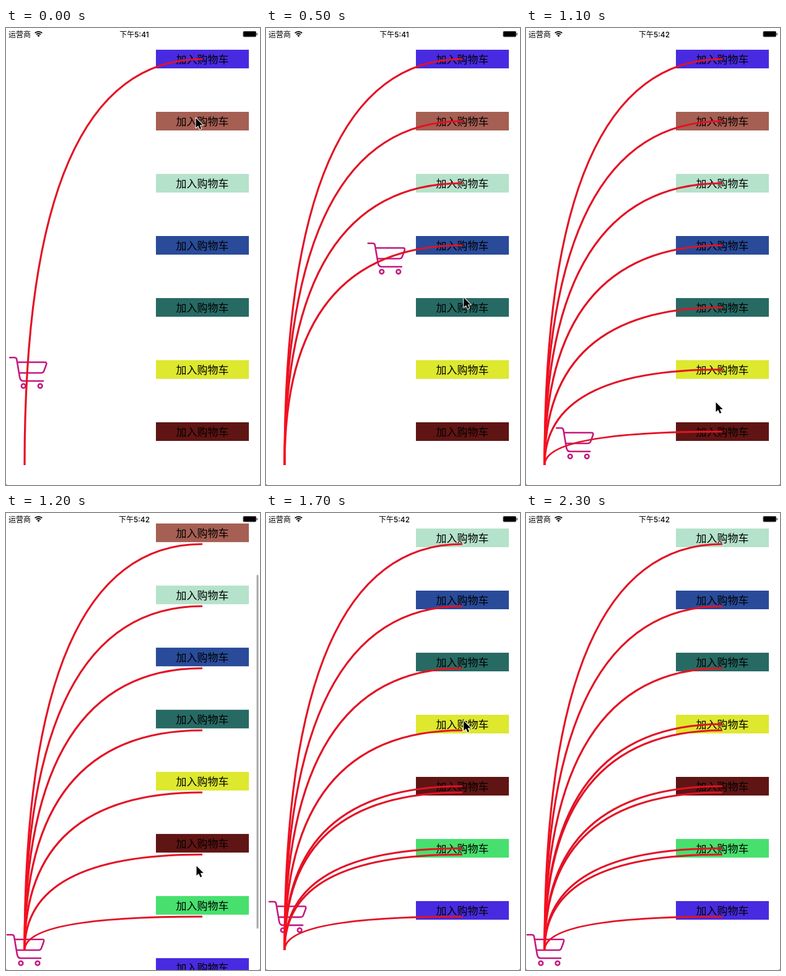
An HTML page with a canvas for the animation above (2400 ms loop, 410 px wide and 736 px high).

```html
<!DOCTYPE html>
<html lang="zh-CN">
<head>
<meta charset="utf-8">
<style>
html, body { margin: 0; width: 100%; height: 100%; overflow: hidden; background: #fff; }
canvas { display: block; width: 410px; height: 736px; }
</style>
</head>
<body>
<canvas id="stage" width="410" height="736"></canvas>
<script>
const ctx = document.getElementById('stage').getContext('2d');
const LOOP = 2400, STEP = 100;
const FLIGHT = 207;              // ms from button to basket
const START_X = 317, END_X = 30, END_Y = 704;
const ROW = 100, MAX_SCROLL = 210, DOWN_TAPS = 7, TAP_COUNT = 10;
const CJK = '"Noto Sans CJK SC", "Noto Sans CJK", sans-serif';
const COLORS = ['#482be0', '#a65f53', '#b5e2ca', '#294b99', '#276a64',
                '#dde82f', '#5f1514', '#47e06e', '#482be0'];

const clamp = v => Math.max(0, Math.min(1, v));
const mix = (a, b, k) => a + (b - a) * k;

// An even rhythm, two quicker taps, then another even run after the scroll
function tapTime(i) {
  if (i < 5) return -182 + 210.3 * i;
  return i < DOWN_TAPS ? 659 + 159 * (i - 4) : 1298 + 217 * (i - DOWN_TAPS);
}

// Taps go down the list, then back up the scrolled list
const taps = Array.from({ length: TAP_COUNT }, (_, i) => ({
  time: tapTime(i),
  y: i < DOWN_TAPS ? 50 + ROW * i : 540 - ROW * (i - DOWN_TAPS)
}));

const scrollAt = t => MAX_SCROLL * clamp((t - 1110) / 160);

function label(text, x, y, font, align) {
  ctx.font = font;
  ctx.textAlign = align;
  ctx.fillStyle = '#000';
  ctx.fillText(text, x, y);
}

function fillRound(color, ...box) {
  ctx.fillStyle = color;
  ctx.beginPath();
  ctx.roundRect(...box);
  ctx.fill();
}

function drawButtons(offset) {
  COLORS.forEach((color, i) => {
    const y = 35 + i * ROW - offset;
    if (y >= 735) return;
    ctx.fillStyle = color;
    ctx.fillRect(242, y, 150, 30);
    label('加入购物车', START_X, y + 22, '17px ' + CJK, 'center');
  });
}

function drawCart(tap, t) {
  const k = clamp((t - tap.time) / FLIGHT);
  ctx.save();
  ctx.translate(mix(END_X, START_X, (1 - k) ** 2), mix(tap.y, END_Y, k * k));
  ctx.strokeStyle = '#c4197f';
  ctx.lineWidth = 2.6;
  ctx.lineCap = ctx.lineJoin = 'round';
  ctx.stroke(new Path2D(
    'M-28-24.8h7.5q3 0 3.6 3L-12 7q1 6 6 6H26' +
    'M-15-17.3H28.5q3.5 0 2.5 3.5L27-3q-1.2 3-4.5 3H-12'));
  for (const x of [-6, 21]) {
    ctx.beginPath();
    ctx.arc(x, 21, 3.3, 0, 7);
    ctx.stroke();
  }
  ctx.restore();
}

function drawCurves(done) {
  // Overlapping strokes look brighter where they meet
  const red = ctx.createLinearGradient(END_X, 0, END_X + 12, 0);
  red.addColorStop(0, done.length > 1 ? '#f80f1e' : '#e31225');
  red.addColorStop(1, '#e31225');
  ctx.strokeStyle = red;
  ctx.lineWidth = 3.2;
  for (const { y } of done) {
    ctx.beginPath();
    ctx.moveTo(START_X, y);
    ctx.quadraticCurveTo(END_X, y, END_X, END_Y);
    ctx.stroke();
  }
}

function drawStatus(t) {
  label('运营商', 4, 15, '12px ' + CJK, 'left');
  label(t < 900 ? '下午5:41' : '下午5:42', 207, 15, '500 12px Inter, ' + CJK, 'center');
  ctx.strokeStyle = '#000';
  ctx.lineWidth = 1.8;
  for (const r of [5, 8.2]) {
    ctx.beginPath();
    ctx.arc(52.5, 14, r, -Math.PI * 0.75, -Math.PI * 0.25);
    ctx.stroke();
  }
  ctx.fill(new Path2D('M52.5 14.5l-2.2-2.4q2.2-1.6 4.4 0z'));
  fillRound('#444', 382.5, 5, 21.5, 9.5, 2);
  fillRound('#000', 383.5, 6, 19.5, 7.5, 1);
  fillRound('#444', 404.5, 8, 1.5, 3.6, 0.7);
}

// The pointer snaps to the next button and rests; the drag is steady
function drawPointer(t, last) {
  const next = Math.min(last + 1, TAP_COUNT - 1);
  const from = taps[last], to = taps[next];
  const k = next > last ? (t - from.time) / (to.time - from.time) : 1;
  const eased = next === DOWN_TAPS ? k : 1 - (1 - k) ** 8;
  const arrow = new Path2D('M0 0V15.5L3.6 12.2L6.2 18L8.8 16.9L6.3 11.2H11.2Z');
  ctx.save();
  ctx.translate(313 - 6.5 * Math.cos(t / 1100 * 2 * Math.PI), mix(from.y, to.y, eased) - 5);
  ctx.lineJoin = 'round';
  ctx.lineWidth = 2;
  ctx.strokeStyle = '#fff';
  ctx.fillStyle = '#000';
  ctx.stroke(arrow);
  ctx.fill(arrow);
  ctx.restore();
}

function draw(t) {
  const offset = scrollAt(t);
  const done = taps.filter(tap => tap.time <= t);
  const last = done.length - 1;
  ctx.fillStyle = '#fff';
  ctx.fillRect(0, 0, 410, 736);
  drawButtons(offset);
  drawCart(done[last], t);
  drawCurves(done);
  drawStatus(t);
  if (t > 1100 && t < 1400) {
    fillRound('rgba(0,0,0,.35)', 404.5, mix(23, 159, offset / MAX_SCROLL), 3, 570, 1.5);
  }
  ctx.fillStyle = '#777';
  ctx.fill(new Path2D('M0 733v3h3q-3 0-3-3zM410 733v3h-3q3 0 3-3z'));
  if (t < 1900) drawPointer(t, last);
}

const began = performance.now();
function tick() {
  const t = (performance.now() - began) % LOOP;
  draw(Math.floor(t / STEP) * STEP);
  requestAnimationFrame(tick);
}
tick();
</script>
</body>
</html>
```
